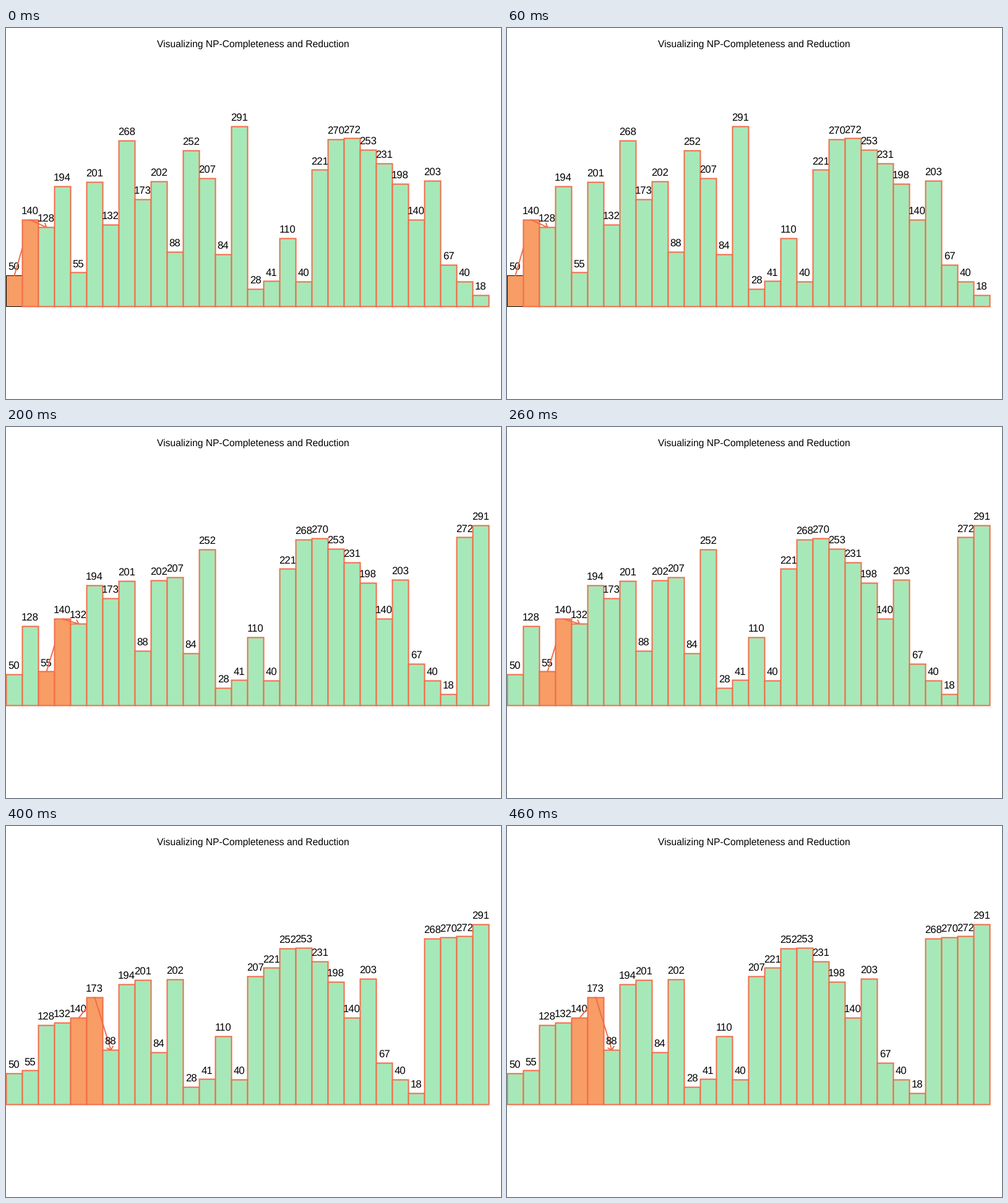
A matplotlib script that plays this animation: 800x600 px, repeating every 0.5 s.

```python
import math

import matplotlib.pyplot as plt
from matplotlib.animation import FuncAnimation
from matplotlib.patches import Rectangle

W, H, DPI = 800, 600, 100
BAR_W, BASE = 26, 450
HALF = 0.5  # strokes are centred on pixel centres
GREEN, ORANGE, EDGE = "#a7e8b8", "#f79d65", "#f26c4a"
START = [50, 140, 128, 194, 55, 201, 132, 268, 173, 202,
         88, 252, 207, 84, 291, 28, 41, 110, 40, 221,
         270, 272, 253, 231, 198, 140, 203, 67, 40, 18]
STEPS = 5

plt.rcParams["font.family"] = "Liberation Sans"
plt.rcParams["text.hinting"] = "none"

fig = plt.figure(figsize=(W / DPI, H / DPI), dpi=DPI, facecolor="white")
ax = fig.add_axes([0, 0, 1, 1])


def px(n):
    """Pixels to points."""
    return n * 72 / DPI


def bubble_pass(values):
    out = list(values)
    for i in range(len(out) - 1):
        if out[i] > out[i + 1]:
            out[i], out[i + 1] = out[i + 1], out[i]
    return out


def top(values, i):
    return i * BAR_W + BAR_W / 2, BASE - values[i]


def label(x, y, text, size, z):
    ax.text(x, y, text, ha="center", va="baseline", size=px(size),
            color="black", zorder=z)


def line(p, q, z):
    ax.plot([p[0] + HALF, q[0] + HALF], [p[1] + HALF, q[1] + HALF],
            color=EDGE, lw=px(2), solid_capstyle="round", snap=False,
            zorder=z)


def arrow(p, q, z):
    line(p, q, z)
    dist = math.hypot(p[0] - q[0], p[1] - q[1])
    bx, by = 5 * (p[0] - q[0]) / dist, 5 * (p[1] - q[1]) / dist
    for side in (-1, 1):
        line(q, (q[0] + bx - side * by, q[1] + by + side * bx), z)


def bar(i, value, active, first, z):
    x, y = i * BAR_W, BASE - value
    ax.add_patch(Rectangle((x, y), BAR_W, value, lw=0, snap=False,
                           facecolor=ORANGE if active else GREEN, zorder=z))
    ax.add_patch(Rectangle((x + HALF, y + HALF), BAR_W, value, fill=False,
                           edgecolor="black" if first else EDGE,
                           lw=px(1 if first else 2), snap=False, zorder=z))


def draw(step):
    ax.clear()
    ax.set(xlim=(0, W), ylim=(H, 0))
    ax.axis("off")
    label(399.5, 31, "Visualizing NP-Completeness and Reduction", 15.6, 5)

    values = START
    for _ in range(step):
        values = bubble_pass(values)

    # Each bar is painted over the arrow that leads to it.
    for i, value in enumerate(values):
        z = 10 + 3 * i
        active = i in (step, step + 1)
        bar(i, value, active, step == 0 and i == 0, z)
        x, y = top(values, i)
        label(x, y - 8, str(value), 16.7, z + 1)
        if active:
            arrow((x, y), top(values, i + 1), z + 2)
    return []


anim = FuncAnimation(fig, draw, frames=STEPS, init_func=lambda: [],
                     interval=100, repeat=True, repeat_delay=0)
plt.show()
```
